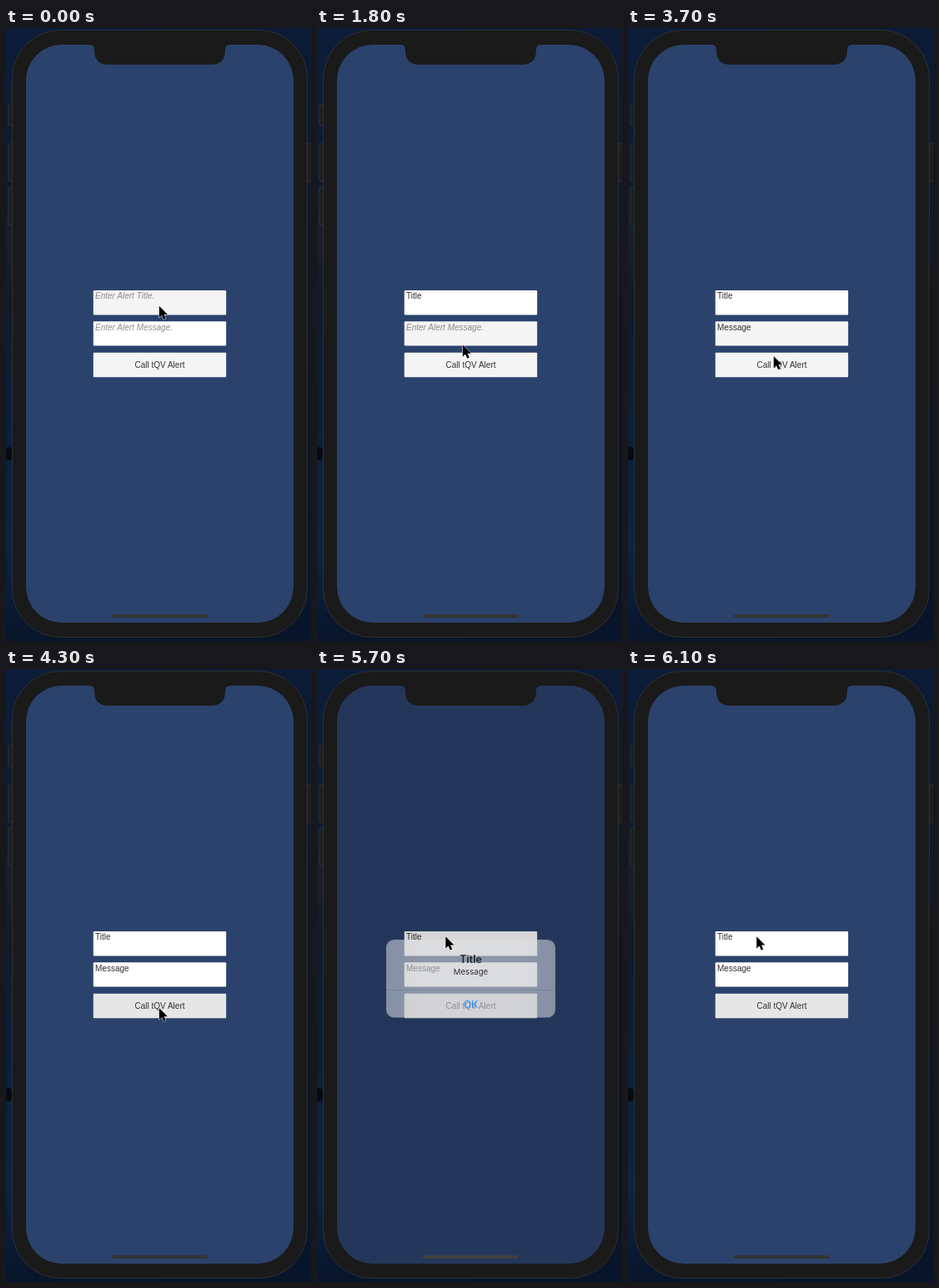
An HTML page that plays this animation: 366x736 px, repeating every 8 s.

```html
<!DOCTYPE html>
<html lang="en">
<head>
<meta charset="utf-8">
<title>Alert demo</title>
<style>
  html, body { margin: 0; width: 100%; height: 100%; overflow: hidden; background: #0a172b; }
  svg { display: block; width: 100%; height: 100%; }
  text { font: 10px "Liberation Sans", Arial, sans-serif; fill: #323232; }
  .hint { font-style: italic; fill-opacity: .55; }
  .mid { text-anchor: middle; }
  #alert text { font-family: Inter, sans-serif; fill: #050505; }
  #alert .title { font-size: 12.5px; font-weight: 600; }
  #alert .body { font-size: 9.6px; }
  #alert .ok { font-size: 12.3px; fill: #0a7aff; }
</style>
</head>
<body>
<svg viewBox="0 0 366 736">
  <defs>
    <linearGradient id="wallLeft" x2="0" y2="1">
      <stop offset="0" stop-color="#0c1d3a"/>
      <stop offset=".25" stop-color="#0d1b30"/>
      <stop offset=".34" stop-color="#1b1f2a"/>
      <stop offset=".45" stop-color="#10192a"/>
      <stop offset=".56" stop-color="#0b1e37"/>
      <stop offset=".85" stop-color="#0c2342"/>
      <stop offset="1" stop-color="#08152a"/>
    </linearGradient>
    <linearGradient id="wallRight" x2="0" y2="1">
      <stop offset="0" stop-color="#0b1b36"/>
      <stop offset=".3" stop-color="#10192a"/>
      <stop offset=".45" stop-color="#12151e"/>
      <stop offset=".8" stop-color="#0b1424"/>
      <stop offset="1" stop-color="#08152a"/>
    </linearGradient>
    <linearGradient id="glass">
      <stop offset="0" stop-color="#d3d7df"/>
      <stop offset=".2" stop-color="#dfe1e5"/>
      <stop offset=".8" stop-color="#dfe1e5"/>
      <stop offset="1" stop-color="#d3d7df"/>
    </linearGradient>
    <clipPath id="display"><rect x="24" y="20" width="321" height="694" rx="43"/></clipPath>
  </defs>

  <rect width="183" height="736" fill="url(#wallLeft)"/>
  <rect x="183" width="183" height="736" fill="url(#wallRight)"/>
  <ellipse cx="3" cy="511" rx="5" ry="8" fill="#060a12"/>

  <g fill="#1d1e20" stroke="#34363a" stroke-width=".8">
    <rect x="3" y="92" width="8" height="25" rx="1"/>
    <rect x="3" y="139" width="8" height="45" rx="1"/>
    <rect x="3" y="191" width="8" height="45" rx="1"/>
    <rect x="358" y="139" width="9" height="45" rx="1"/>
    <rect x="7.5" y="2.5" width="354" height="729" rx="58" fill="#1a1a1a"/>
  </g>

  <g clip-path="url(#display)">
    <rect x="24" y="20" width="321" height="694" fill="#2b426c"/>
    <g id="form">
      <rect id="titleBox" x="104.8" y="315" width="159.4" height="29.4" rx="1"/>
      <rect id="messageBox" x="104.8" y="352.2" width="159.4" height="29.4" rx="1"/>
      <rect id="button" x="104.8" y="389.8" width="159.4" height="29.4" rx="1"/>
      <text id="titleText" x="107" y="325.4"></text>
      <text id="messageText" x="107" y="362.8"></text>
      <text class="mid" x="184.5" y="408.2">Call tQV Alert</text>
    </g>
    <rect id="homeBar" x="127" y="704" width="115" height="4" rx="2"/>
    <rect id="dim" x="24" y="20" width="321" height="694"/>
    <g id="alert">
      <rect id="panel" x="83" y="325" width="203" height="93.5" rx="9.5" fill="url(#glass)"/>
      <g id="content">
        <path d="M83 385.5H286" stroke="#3c3c43" stroke-opacity=".25" stroke-width=".8"/>
        <text class="mid title" x="184.5" y="352.5">Title</text>
        <text class="mid body" x="184.5" y="367.4">Message</text>
        <text class="mid ok" x="184.5" y="406.7">OK</text>
      </g>
    </g>
  </g>
  <path fill="#1a1a1a" d="M100 19V20Q106 20 106 26V27Q106 44 123 44H246Q263 44 263 27V26Q263 20 269 20V19Z"/>
  <path id="cursor" d="M0 0V14.2L3.3 11.2L5.5 16.2L8 15.1L5.8 10.2H10.2Z" fill="#000"
        stroke="#fff" stroke-width="1" stroke-linejoin="round" paint-order="stroke"/>
</svg>
<script>
const LOOP = 8000, STEP = 100;
const $ = id => document.getElementById(id);
const gray = v => `rgb(${v},${v},${v})`;

// Linear interpolation through [time, ...values] keys.
function track(keys, t) {
  const next = keys.findIndex(k => k[0] > t);
  if (next === 0) return keys[0].slice(1);
  if (next < 0) return keys[keys.length - 1].slice(1);
  const from = keys[next - 1], to = keys[next];
  const p = (t - from[0]) / (to[0] - from[0]);
  return from.slice(1).map((v, i) => v + (to[i + 1] - v) * p);
}

const cursorPath = [
  [1000, 183.8, 333.8], [1200, 178, 368], [1300, 174.8, 380.5],
  [3500, 174.8, 380.5], [3700, 174.8, 394], [4100, 183.8, 407],
  [5400, 183.8, 407], [5500, 178, 388], [5600, 161, 338], [5700, 154.3, 321.3]
];
const titleShade = [[1600, 244], [1800, 255]];
const messageShade = [[1600, 255], [1800, 244], [4200, 244], [4300, 255]];
const buttonShade = [[4200, 244], [4300, 230]];
const fadeOut = [[5500, 1], [5600, .96], [5700, .8], [5800, .48], [5900, .2], [6000, .06], [6100, 0]];
const messageKeys = [2800, 2800, 3100, 3300, 3300, 3500, 3600];
const titleKeys = [400, 500, 600, 700, 800];

function type(id, word, keyTimes, hint, t) {
  const count = keyTimes.filter(k => k <= t).length;
  $(id).textContent = count ? word.slice(0, count) : hint;
  $(id).setAttribute("class", count ? "" : "hint");
}

function draw(t) {
  type("titleText", "Title", titleKeys, "Enter Alert Title.", t);
  type("messageText", "Message", messageKeys, "Enter Alert Message.", t);
  $("titleBox").style.fill = gray(track(titleShade, t)[0]);
  $("messageBox").style.fill = gray(track(messageShade, t)[0]);
  $("button").style.fill = gray(track(buttonShade, t)[0]);

  const appear = t < 4400 ? 0 : 1 - Math.exp(-(t - 4350) / 60);
  const shown = appear * track(fadeOut, t)[0];
  const scale = 1 + .15 * (1 - appear);
  $("dim").style.opacity = .2 * shown;
  $("panel").style.opacity = shown ** (t < 5500 ? 1 : 2.6);
  $("content").style.opacity = shown;
  $("alert").setAttribute("transform",
    `translate(184.5 371.7) scale(${scale}) translate(-184.5 -371.7)`);
  $("homeBar").style.fill = gray(52 + 30 * shown);
  $("cursor").setAttribute("transform", `translate(${track(cursorPath, t)})`);
}

const start = performance.now();
function frame() {
  const t = (performance.now() - start) % LOOP;
  draw(Math.floor(t / STEP) * STEP);
  requestAnimationFrame(frame);
}
frame();
</script>
</body>
</html>
```
